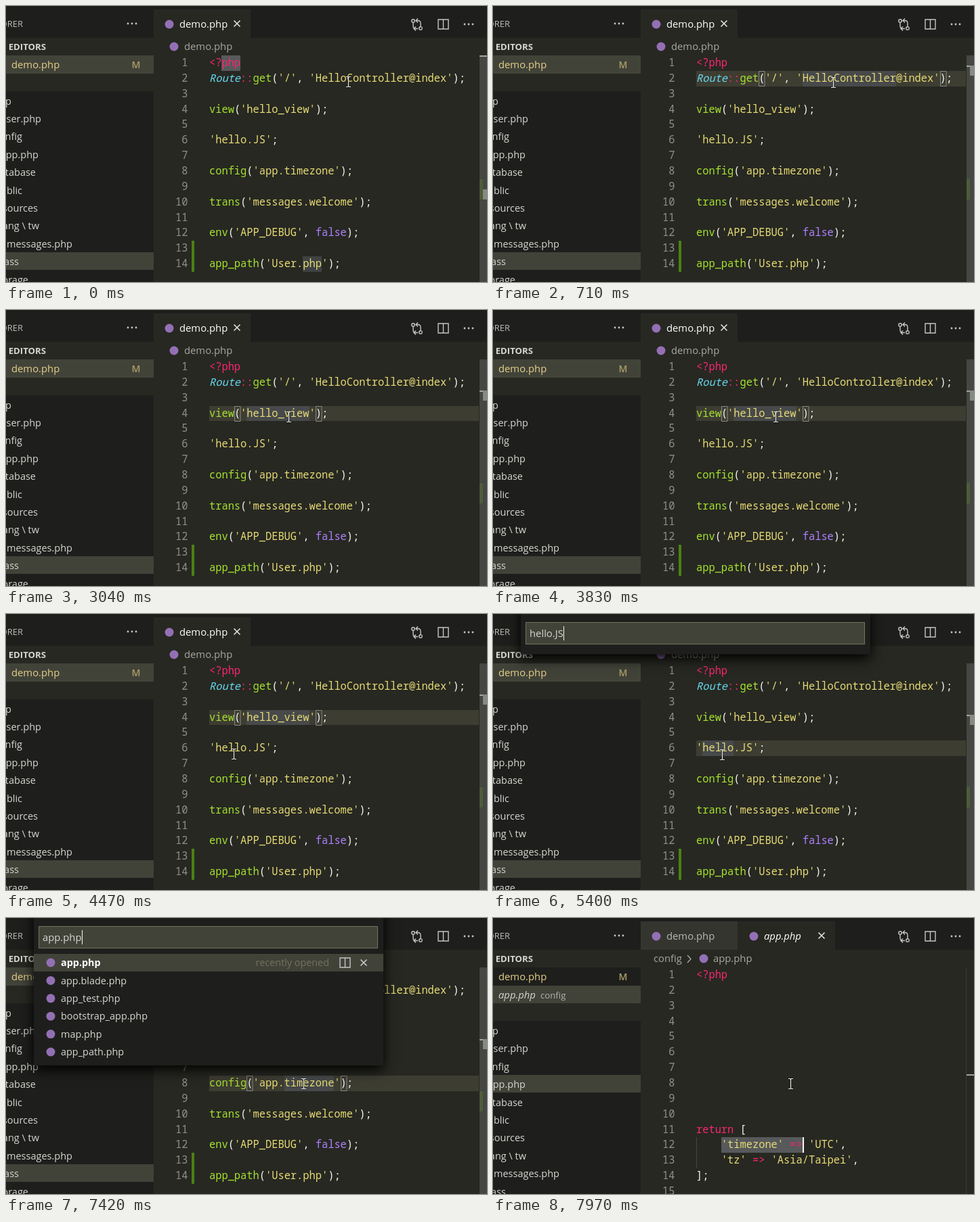
An HTML page with a canvas that plays this animation: 710x408 px, repeating every 8 s.

```html
<!DOCTYPE html>
<html lang="en">
<head>
<meta charset="utf-8">
<title>Editor quick open</title>
<style>
  html, body { margin: 0; width: 100%; height: 100%; overflow: hidden; background: #272822; }
  canvas { display: block; width: 710px; height: 408px; }
</style>
</head>
<body>
<canvas id="stage" width="710" height="408"></canvas>
<script>
const ctx = document.getElementById('stage').getContext('2d');
const LOOP = 8000, TAB_AT = 7810, FILE_AT = 7970;
const CODE_X = 300, CODE_Y = 73, CHAR = 9.22, LINE = 22.85, ROW = 26.4;
const SANS = '"Open Sans", "Noto Sans", sans-serif';
const MONO = '500 15.37px "Noto Sans Mono", monospace';
const C = {
  bg: '#272822', side: '#1e1f1c', row: '#414339', tab: '#34352f', line: '#3e3d32',
  text: '#f8f8f2', dim: '#a8a8a2', ui: '#d6d6d2', modified: '#e6cf88', icon: '#9370b4',
  string: '#e6db74', keyword: '#f92672', call: '#a6e22e', type: '#66d9ef', constant: '#ae81ff',
  select: '#57595a', match: '#3f4242', word: '#47494a'
};

const demoCode = [
  '<?php', "Route::get('/', 'HelloController@index');", '', "view('hello_view');", '',
  "'hello.JS';", '', "config('app.timezone');", '', "trans('messages.welcome');", '',
  "env('APP_DEBUG', false);", '', "app_path('User.php');"
];
const appCode = ['<?php', '', '', '', '', '', '', '', '', '', 'return [',
  "    'timezone' => 'UTC',", "    'tz' => 'Asia/Taipei',", '];', ''];
const tree = [['app', 8], ['User.php', 52], ['config', 24], ['app.php', 48], ['database', 44],
  ['public', 24], ['resources', 47], ['lang \\ tw', 49], ['messages.php', 98], ['class', 19], ['storage', 33]];

// Columns count characters from the start of the line.
const clicks = [
  { at: 160, line: 2, col: 22, off: 710, word: [17, 15], wordAt: 480, pair: [10, 39], pairAt: 240 },
  { at: 2580, line: 4, col: 12, off: 3040, word: [6, 10], wordAt: 2810, pair: [4, 17], pairAt: 2580 },
  { at: 4630, line: 6, col: 4, off: 5090, word: [1, 5], wordAt: 4860, pair: [], pairAt: 0 },
  { at: 6650, line: 8, col: 15, off: 7190, word: [12, 8], wordAt: 6880, pair: [6, 21], pairAt: 6730 }
];
const panels = [
  { at: 1100, list: 1100, off: 1640, end: 1720, query: 'HelloController.php', items: ['HelloController.php'] },
  { at: 3280, list: 3360, off: 3830, end: 3830, query: 'hello_view',
    items: ['hello_view.blade.php', 'hello_view.php', 'hello_view_test.php'] },
  { at: 5400, list: 5490, off: 5940, end: 6100, query: 'hello.JS',
    items: ['hello.js', 'hello.json', 'hello.spec.js', 'hello.min.js'] },
  { at: 7350, list: 7420, off: 7900, end: TAB_AT, query: 'app.php',
    items: ['app.php', 'app.blade.php', 'app_test.php', 'bootstrap_app.php', 'map.php', 'app_path.php'] }
];
const moves = [
  { at: 240, steps: 1, to: [502, 113] },
  { at: 2030, steps: 6, to: [417, 158] },
  { at: 3910, steps: 8, to: [336, 207] },
  { at: 4860, steps: 1, to: [338, 208] },
  { at: 6180, steps: 6, to: [445, 245] },
  { at: 6730, steps: 1, to: [439, 245] }
];

const lineTop = n => Math.round(CODE_Y + (n - 1) * LINE);
const lineHeight = n => lineTop(n + 1) - lineTop(n);
const colX = c => CODE_X + c * CHAR;

function rect(x, y, w, h, color) {
  ctx.fillStyle = color;
  ctx.fillRect(x, y, w, h);
}

// Text is placed by the vertical middle of its capital letters.
function label(str, x, mid, color, { size = 14.8, style = '', align = 'left' } = {}) {
  ctx.font = `${style} ${size}px ${SANS}`;
  ctx.textAlign = align;
  ctx.fillStyle = color;
  ctx.fillText(str, x, mid + size * 0.36);
}

function stroke(path, color = '#c5c5c5', width = 1.4) {
  ctx.strokeStyle = color;
  ctx.lineWidth = width;
  ctx.stroke(new Path2D(path));
}

function dot(x, y, r, color) {
  ctx.fillStyle = color;
  ctx.beginPath();
  ctx.arc(x, y, r, 0, 7);
  ctx.fill();
}

const fileIcon = (x, y) => dot(x, y, 6.5, C.icon);
const dots = (x, y) => [-6, 0, 6].forEach(d => dot(x + d, y, 1.4, '#c5c5c5'));
const cross = (x, y, color) => stroke(`M${x - 4.5} ${y - 4.5}l9 9m0 -9l-9 9`, color, 1.5);
const splitIcon = (x, y) => stroke(`M${x - 7} ${y - 7}h15v14h-15zm7.5 0v14`);

function sidebar(tabOpen, fileOpen) {
  rect(0, 0, 218, 408, C.side);
  label('EXPLORER', 25, 26, '#bdbdb8', { size: 13, align: 'right' });
  dots(186, 26);
  rect(0, 47, 218, 26, C.bg);
  label('OPEN EDITORS', 59, 60, C.ui, { size: 13.2, style: 'bold', align: 'right' });

  const shift = tabOpen ? ROW : 0;
  rect(0, 100 + Math.round(shift), 218, 26, C.bg);
  rect(0, fileOpen ? 100 : 73, 218, fileOpen ? 26 : 27, C.row);
  label('demo.php', 8, 87, C.modified);
  label('M', 192, 87, '#ab9c68', { size: 14, style: '600', align: 'center' });
  if (tabOpen) {
    label('app.php', 8, 114, C.ui, { style: 'italic' });
    label('config', 70, 114, '#b4b4ae', { size: 13.2 });
  }

  const selected = fileOpen ? 3 : 9;
  tree.forEach(([name, right], i) => {
    const mid = 140.3 + i * ROW + shift;
    if (i === selected) rect(0, Math.round(mid - 13.5), 218, 26, C.row);
    label(name, right, mid, C.ui, { size: 14.5, align: 'right' });
  });
}

function header(tabOpen) {
  rect(218, 0, 492, 47, C.side);
  rect(218, 5, 143, 42, tabOpen ? C.tab : C.bg);
  fileIcon(241, 27);
  label('demo.php', 256, 27, tabOpen ? '#b9b9b4' : '#ffffff');
  if (tabOpen) {
    rect(361, 5, 144, 42, C.bg);
    fileIcon(385, 27);
    label('app.php', 400, 27, '#ffffff', { style: 'italic' });
    cross(485, 26, '#e8e8e8');
    label('config', 237, 60, C.dim);
    stroke('M287 55l5 5.5l-5 5.5', C.dim);
    fileIcon(311, 60);
    label('app.php', 325, 60, C.dim);
  } else {
    cross(341, 26, '#e8e8e8');
    fileIcon(248, 60);
    label('demo.php', 263, 60, C.dim);
  }
  stroke('M601 24.5v5q0 4 4 4h3m-3 -3l-3 3l3 3M612 30.5v-5q0 -4 -4 -4h-3m3 -3l-3 3l3 3');
  stroke('M603.3 22a2.3 2.3 0 1 1 -4.6 0a2.3 2.3 0 1 1 4.6 0M614.3 33a2.3 2.3 0 1 1 -4.6 0a2.3 2.3 0 1 1 4.6 0');
  splitIcon(645, 27);
  dots(683, 27);
}

function tokenColor(token) {
  if (token[0] === "'") return C.string;
  if (/^(<\?php|::|=>|return)$/.test(token)) return C.keyword;
  if (token === 'Route') return C.type;
  if (token === 'false') return C.constant;
  return /^\w/.test(token) ? C.call : C.text;
}

function code(lines) {
  lines.forEach((str, i) => {
    const y = lineTop(i + 1) + 16;
    ctx.font = MONO;
    ctx.textAlign = 'right';
    ctx.fillStyle = '#90908a';
    ctx.fillText(i + 1, 268.5, y);
    ctx.textAlign = 'left';
    for (const { 0: token, index } of str.matchAll(/'[^']*'|<\?php|::|=>|\w+|\S/g)) {
      ctx.font = (token === 'Route' ? 'italic ' : '') + MONO;
      ctx.fillStyle = tokenColor(token);
      ctx.fillText(token, colX(index), y);
    }
  });
}

function mark(line, col, length, color) {
  const left = Math.round(colX(col));
  rect(left, lineTop(line), Math.round(colX(col + length)) - left, lineHeight(line), color);
}

const caret = (line, col) => rect(Math.round(colX(col)) - 1, lineTop(line), 2, lineHeight(line), C.text);
const rulerY = line => Math.round(CODE_Y + (line - 1) * 15.2);
const rulerLine = y => rect(699, y, 11, 2, '#a5a5a0');
const rulerWord = line => rect(704, rulerY(line), 6, 15, '#858a83');

function demoEditor(t) {
  const click = clicks.findLast(c => t >= c.at);
  rect(699, 73, 11, 335, '#464742');
  rect(699, 256, 5, 30, '#4e5c3a');
  rect(274, 347, 4, 46, '#4b8014');
  if (!click) {
    mark(1, 2, 3, C.select);
    mark(14, 15, 3, C.match);
    rulerLine(CODE_Y);
    rulerWord(14);
    code(demoCode);
    return;
  }
  const { line, col, word, pair } = click;
  rect(CODE_X, lineTop(line), 398, lineHeight(line), C.line);
  rulerLine(rulerY(line));
  if (t >= click.wordAt) {
    mark(line, ...word, C.word);
    rulerWord(line);
  }
  if (t >= click.pairAt) {
    for (const c of pair) stroke(`M${Math.round(colX(c)) + .5} ${lineTop(line) + .5}h8.5v22h-8.5z`, '#888888', 1);
  }
  code(demoCode);
  if (t < click.off) caret(line, col);
}

function appEditor() {
  rect(698, 73, 1, 335, '#3a3b36');
  rect(300, lineTop(12), 1, LINE * 2, '#464741');
  mark(12, 4, 13, C.select);
  rulerLine(231);
  code(appCode);
  caret(12, 17.1);
}

function quickOpen(t) {
  const panel = panels.find(p => t >= p.at && t < p.end);
  if (!panel) return;
  const items = t >= panel.list ? panel.items : [];
  const bottom = 59.5 + items.length * ROW;
  ctx.save();
  ctx.shadowColor = '#000';
  ctx.shadowBlur = 18;
  ctx.shadowOffsetY = 6;
  rect(41, -20, 516, bottom + 20, C.side);
  ctx.restore();

  rect(48, 12, 501, 33, C.row);
  stroke('M48.5 12.5h500v32h-500z', '#75715e', 1);
  label(panel.query, 54, 29, '#d6d6d0');
  const inputEnd = 54 + ctx.measureText(panel.query).width;
  if (t < panel.off) rect(Math.round(inputEnd), 18, 1, 21, C.text);

  items.forEach((name, i) => {
    const mid = 66 + i * ROW;
    if (i === 0) rect(41, mid - 13, 516, 26, C.row);
    fileIcon(66, mid);
    label(name, 81, mid, i ? C.ui : '#ffffff', { size: 14.4, style: i ? '' : 'bold' });
    if (i > 0) return;
    label('recently opened', 477, mid, '#75715e', { size: 14.4, align: 'right' });
    splitIcon(500, mid);
    cross(528, mid, '#d0d0d0');
  });
}

function pointer(t) {
  let pos = [505, 112];
  for (const { at, steps, to } of moves) {
    if (t < at) break;
    const k = Math.min(steps, Math.floor((t - at) / 78) + 1) / steps;
    const eased = k * k * (3 - 2 * k);
    pos = pos.map((p, i) => Math.round(p + (to[i] - p) * eased));
  }
  const [x, y] = pos;
  const beam = `M${x - 3} ${y - 7.5}h2.5l1 1l1 -1h2.5M${x + .5} ${y - 7}v14M${x - 3} ${y + 7.5}h2.5l1 -1l1 1h2.5`;
  stroke(beam, 'rgba(0,0,0,.45)', 2.6);
  stroke(beam, '#f0f0ec', 1.2);
}

function draw(t) {
  const tabOpen = t >= TAB_AT, fileOpen = t >= FILE_AT;
  rect(0, 0, 710, 408, C.bg);
  sidebar(tabOpen, fileOpen);
  header(tabOpen);
  if (fileOpen) appEditor(); else demoEditor(t);
  quickOpen(t);
  pointer(t);
}

let start;
function frame(now) {
  start ??= now;
  draw((now - start) % LOOP);
  requestAnimationFrame(frame);
}
requestAnimationFrame(frame);
</script>
</body>
</html>
```
